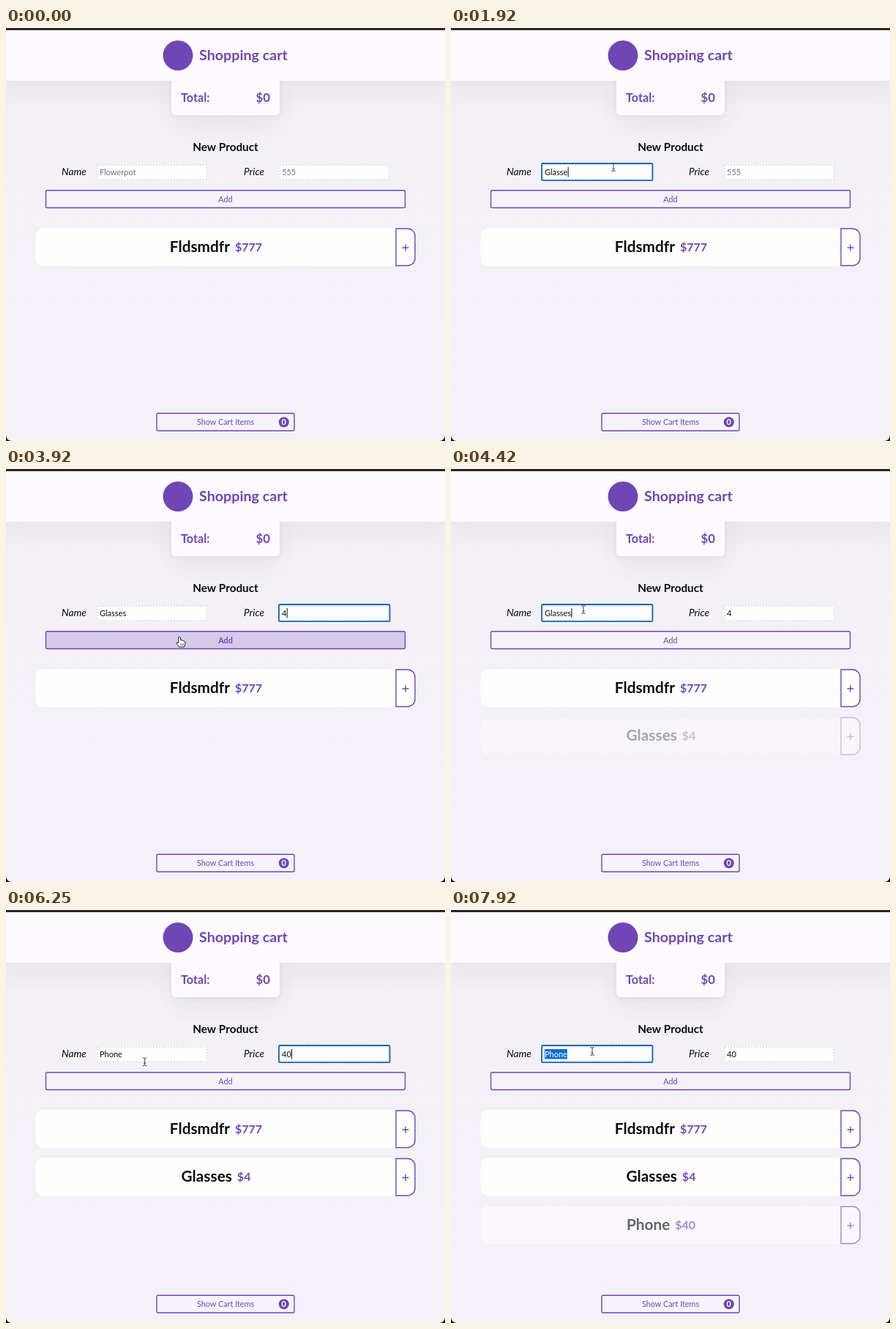
These frames come from a looping animation (600 by 564 pixels, 8000 ms). An HTML page with a canvas:

```html
<!DOCTYPE html>
<html lang="en">
<head>
<meta charset="utf-8">
<title>Shopping cart</title>
<style>
html, body { margin: 0; width: 100%; height: 100%; overflow: hidden; background: #f3f0f7; }
canvas { display: block; width: 600px; height: 564px; }
</style>
</head>
<body>
<canvas id="stage"></canvas>
<script>
const LOOP = 8000, W = 600, H = 564;
const PURPLE = '#7046b6', BLUE = '#1767b9', SELECT = '#0b6bd3';
const canvas = document.getElementById('stage');
const dpr = window.devicePixelRatio || 1;
canvas.width = W * dpr;
canvas.height = H * dpr;
const c = canvas.getContext('2d');

// Each list holds [time, value] pairs; a value holds until the next time.
const typed = (word, start, step) =>
  [...word].map((_, i) => [start + i * step, word.slice(0, i + 1)]);
const nameKeys = [[0, ''], ...typed('Glasses', 1170, 140), ...typed('Phone', 4750, 140)];
const priceKeys = [[0, ''], [3450, '4'], [5830, '4'], [5990, '40']];
const focusKeys = [[0, ''], [750, 'name'], [2500, 'price'], [4010, ''],
  [4330, 'name'], [5580, 'price'], [7170, ''], [7580, 'name']];
const selectKeys = [[0, ''], [4500, 'name'], [4750, ''], [5580, 'price'],
  [5830, ''], [7670, 'name']];
const products = [
  { name: 'Fldsmdfr', price: '$777', at: -LOOP },
  { name: 'Glasses', price: '$4', at: 4010 },
  { name: 'Phone', price: '$40', at: 7170 }
];
// Pointer stops: time, x, y
const path = [[80, 430, -14], [650, 222, 190], [3500, 222, 190], [3830, 237, 229],
  [4050, 237, 229], [4310, 181, 192], [6080, 181, 192], [6480, 203, 231],
  [7220, 203, 231], [7560, 193, 193], [LOOP, 193, 193]];

const current = (keys, t) => keys.filter(k => k[0] <= t).pop();

function pointer(t) {
  const i = path.findIndex(p => p[0] > t);
  if (i < 1) return null;
  const [t0, x0, y0] = path[i - 1], [t1, x1, y1] = path[i];
  const u = (t - t0) / (t1 - t0), e = u * u * (3 - 2 * u);
  return { x: x0 + (x1 - x0) * e, y: y0 + (y1 - y0) * e };
}

function setFont(size, style = '') {
  c.font = `${style} ${size}px Lato, sans-serif`;
}

function text(str, x, y, size, color, style, align = 'left') {
  setFont(size, style);
  c.textAlign = align;
  c.fillStyle = color;
  c.fillText(str, x, y);
}

function box(x, y, w, h, r, fill, stroke, line = 1.4) {
  c.beginPath();
  c.roundRect(x, y, w, h, r);
  if (fill) { c.fillStyle = fill; c.fill(); }
  if (stroke) { c.strokeStyle = stroke; c.lineWidth = line; c.stroke(); }
}

function disc(x, y, r) {
  c.beginPath();
  c.arc(x, y, r, 0, Math.PI * 2);
  c.fillStyle = PURPLE;
  c.fill();
}

function shadow(color, blur, dy) {
  c.shadowColor = color;
  c.shadowBlur = blur * dpr;
  c.shadowOffsetY = dy * dpr;
}

function drawPage() {
  c.fillStyle = '#151218';
  c.fillRect(0, 0, W, H);
  const bg = c.createLinearGradient(0, 72, 0, H);
  bg.addColorStop(0, '#f3f0f6');
  bg.addColorStop(1, '#f4f1f9');
  box(0, 0, W, H, [0, 0, 8, 8], bg);

  c.save();
  shadow('rgba(70,60,85,0.07)', 36, 14);
  box(226, 60, 148, 59, 6, '#fcfafd');
  box(-20, 2, W + 40, 70, 0, '#fcfafd');
  shadow('rgba(70,60,85,0.08)', 6, 2);
  box(226, 66, 148, 53, 6, '#fcfafd');
  c.restore();
  box(0, 2, W, 70, 0, '#fdfbfd');
  c.fillStyle = '#2b252e';
  c.fillRect(0, 0, W, 3);

  disc(235, 37.5, 20.5);
  text('Shopping cart', 264, 44, 19.7, PURPLE, 'bold');
  text('Total:', 239, 101, 16.2, PURPLE, 'bold');
  text('$0', 361, 101, 16.8, PURPLE, 'bold', 'right');
  text('New Product', 300, 168, 15.3, '#0c0b0d', 'bold', 'center');
  text('Name', 76, 201, 13.7, '#0c0b0d', 'italic');
  text('Price', 325, 201, 13.7, '#0c0b0d', 'italic');
}

function drawInput(id, x, hint, keys, t) {
  const [typedAt, value] = current(keys, t);
  const [focusAt, focus] = current(focusKeys, t);
  const selected = current(selectKeys, t)[1] === id;
  box(x - 1, 186, 151, 22, 0, '#fffeff');
  c.save();
  c.setLineDash([2, 2]);
  box(x, 187, 149, 20, 0, null, '#dcd7e4');
  c.restore();
  if (focus === id) box(x - 1, 185, 151.5, 23.2, 1.5, null, BLUE, 1.8);

  const tx = x + 3;
  setFont(11);
  const width = c.measureText(value).width;
  if (selected) box(tx, 190, width, 13.5, 0, SELECT);
  text(value || hint, tx, 200.5, 11, selected ? '#fff' : value ? '#0c0b0d' : '#77747a');

  const since = t - Math.max(typedAt, focusAt);
  if (focus === id && !selected && since % 1000 < 500) {
    c.fillStyle = '#111';
    c.fillRect(tx + width + 0.3, 190, 1, 13.5);
  }
}

function drawProduct(item, i, t) {
  const alpha = Math.min(1, (t - item.at) / 1200);
  if (alpha <= 0) return;
  const y = 273.5 + i * 65.5;
  c.save();
  c.globalAlpha = alpha;
  box(40.5, y, 518.5, 51.5, 10, '#fffeff');
  box(533, y + 0.5, 26, 50.5, [0, 10, 10, 0], null, PURPLE);
  c.beginPath();
  c.moveTo(541.5, y + 26.5);
  c.lineTo(550.5, y + 26.5);
  c.moveTo(546, y + 22);
  c.lineTo(546, y + 31);
  c.stroke();

  setFont(20.8, 'bold');
  const nameW = c.measureText(item.name).width;
  setFont(16, 'bold');
  const priceW = c.measureText(item.price).width;
  const x = 287 - (nameW + 7 + priceW) / 2;
  text(item.name, x, y + 32, 20.8, '#0c0b0d', 'bold');
  text(item.price, x + nameW + 7, y + 31.3, 16, PURPLE, 'bold');
  c.restore();
}

function drawHand() {
  c.beginPath();
  c.moveTo(-1.5, 1);
  c.quadraticCurveTo(0, -1, 1.4, 1);
  c.lineTo(1.8, 5);
  c.quadraticCurveTo(3.4, 4, 4.2, 5.5);
  c.quadraticCurveTo(6, 4.8, 6.3, 6.3);
  c.quadraticCurveTo(8, 6, 8, 8);
  c.quadraticCurveTo(8, 11, 6.5, 14);
  c.lineTo(-0.5, 14);
  c.quadraticCurveTo(-2, 11, -4, 9);
  c.quadraticCurveTo(-3.8, 6.8, -1, 8.5);
  c.closePath();
  c.fill();
  c.stroke();
  c.beginPath();
  for (const x of [1.5, 3.5, 5.5]) {
    c.moveTo(x, 9.5);
    c.lineTo(x, 12);
  }
  c.lineWidth = 0.7;
  c.stroke();
}

function drawBeam() {
  c.beginPath();
  for (const s of [-1, 1]) {
    c.moveTo(-2.8, s * 5.5);
    c.quadraticCurveTo(0, s * 5.5, 0, s * 4);
    c.quadraticCurveTo(0, s * 5.5, 2.8, s * 5.5);
  }
  c.moveTo(0, -4.5);
  c.lineTo(0, 4.5);
  c.moveTo(-1.5, 2);
  c.lineTo(1.5, 2);
  c.strokeStyle = '#444';
  c.stroke();
}

function drawArrow() {
  c.beginPath();
  for (const [x, y] of [[0, 0], [0, 12], [2.8, 9.4], [4.6, 13.4], [6.4, 12.6], [4.7, 8.8], [8.4, 8.6]]) {
    c.lineTo(x, y);
  }
  c.closePath();
  c.fillStyle = '#111';
  c.strokeStyle = '#fff';
  c.fill();
  c.stroke();
}

function drawPointer(p, overAdd) {
  const overName = p.x > 123 && p.x < 276 && p.y > 185 && p.y < 209;
  c.save();
  c.translate(p.x, p.y);
  c.lineWidth = 1;
  c.lineJoin = 'round';
  c.fillStyle = '#fff';
  c.strokeStyle = '#222';
  if (overAdd) drawHand();
  else if (overName) drawBeam();
  else drawArrow();
  c.restore();
}

function draw(t) {
  c.setTransform(dpr, 0, 0, dpr, 0, 0);
  const p = pointer(t);
  const overAdd = p && p.x > 54 && p.x < 546 && p.y > 221 && p.y < 246;
  drawPage();
  drawInput('name', 125, 'Flowerpot', nameKeys, t);
  drawInput('price', 374, '555', priceKeys, t);
  box(54.5, 221.7, 491, 23.8, 2, overAdd ? '#d6cae8' : '#f5f2f8', PURPLE);
  text('Add', 300, 237.5, 10.8, PURPLE, overAdd ? 'bold' : '', 'center');
  products.forEach((item, i) => drawProduct(item, i, t));
  box(206, 526.2, 188, 23.8, 2, '#f6f3fa', PURPLE);
  text('Show Cart Items', 300, 542, 10.8, PURPLE, '', 'center');
  disc(379.8, 538.3, 7);
  text('0', 379.8, 542.3, 11, '#fff', 'bold', 'center');
  if (p) drawPointer(p, overAdd);
}

const start = performance.now();
function tick() {
  draw((performance.now() - start) % LOOP);
  requestAnimationFrame(tick);
}
tick();
</script>
</body>
</html>
```
